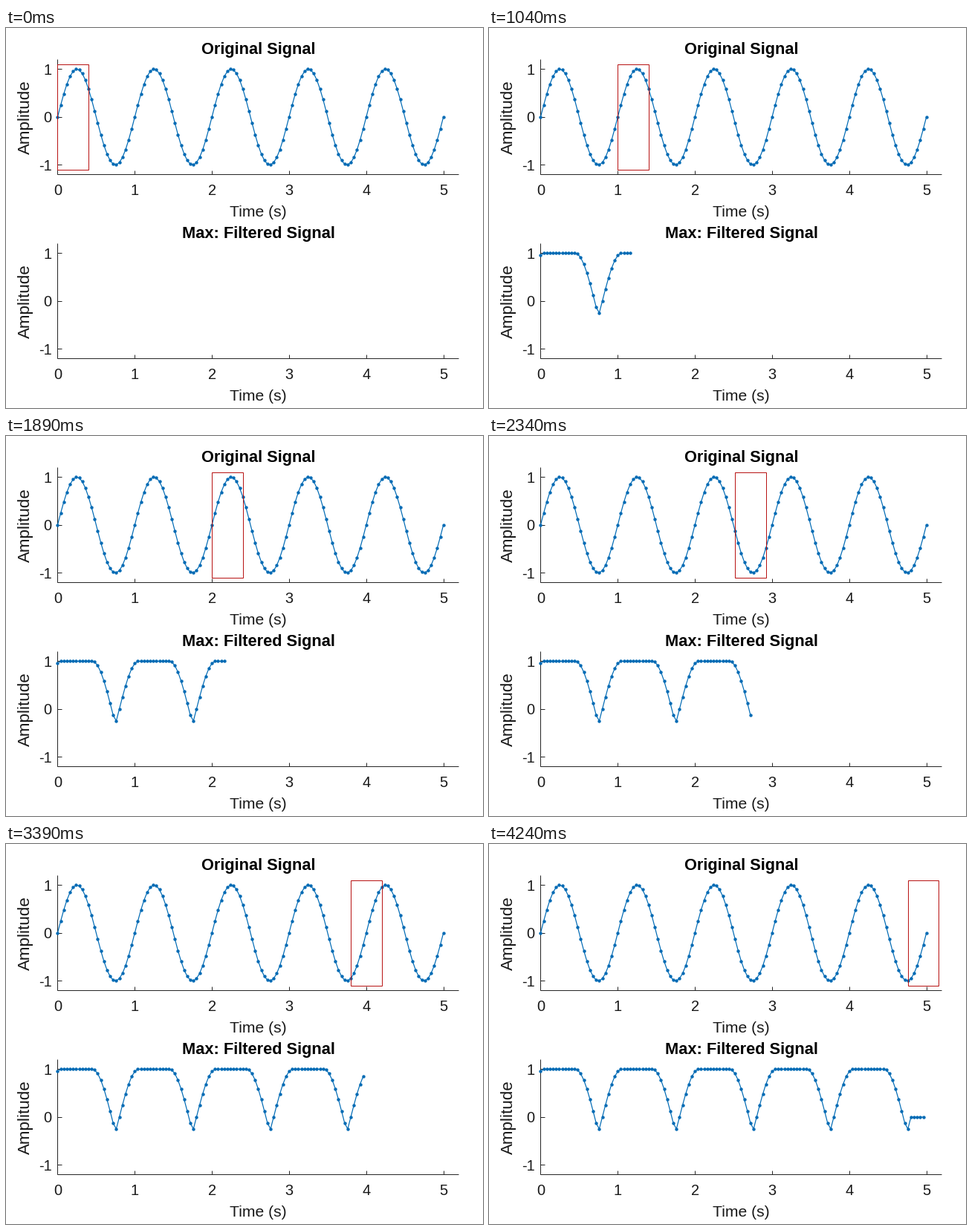
These frames come from a looping animation (642 by 512 pixels, 4290 ms). A matplotlib script:

```python
import numpy as np
import matplotlib.pyplot as plt
from matplotlib.animation import FuncAnimation
from matplotlib.lines import Line2D
from matplotlib.patches import Rectangle
from matplotlib.transforms import Affine2D

W, H, DPI = 642, 512, 100
PX = 72 / DPI                      # points per pixel
TICK_MS, LOOP_MS = 10, 4290
FIRST_MS, STEP_MS = 40, 50         # the first pose is held a little shorter

X0, XS, YS = 69.45, 540 / 5.2, 155 / 2.4
TOP, BOTTOM = 119.9, 367.9         # y pixel of amplitude 0
AXIS, INK, BLUE, RED = "#262626", "#181818", "#006ab4", "#b81414"

DT, HALF = 0.04, 5
t = np.arange(126) * DT
signal = np.sin(2 * np.pi * t)
filtered = np.array([signal[max(0, i - HALF):i + HALF + 1].max()
                     for i in range(len(t))])

fig = plt.figure(figsize=(W / 100, H / 100), dpi=DPI, facecolor="white")
pixels = Affine2D().scale(1 / W, -1 / H).translate(0, 1) + fig.transFigure


def line(x, y, color=AXIS, width=1, **kw):
    art = Line2D(x, y, color=color, lw=width * PX, transform=pixels, **kw)
    return fig.add_artist(art)


def curve(x, y, mid):
    return line(X0 + XS * x, mid - YS * y, BLUE, 1.2, marker="o",
                markersize=4.4 * PX, markeredgewidth=0)


def text(x, y, s, size, color=INK, ha="center", **kw):
    fig.text(x, y, s, transform=pixels, fontsize=size * PX, color=color,
             family="Liberation Sans", ha=ha, va="baseline", **kw)


def panel(mid, title):
    base = mid + 1.2 * YS
    line([X0, X0], [mid - 1.2 * YS, base], solid_capstyle="butt")
    line([X0, X0 + 5.2 * XS], [base, base], solid_capstyle="butt")
    for v in range(6):
        x = X0 + v * XS
        line([x, x], [base, base - 5.4], solid_capstyle="butt")
        text(x, base + 28, str(v), 20)
    for v in (-1, 0, 1):
        y = mid - v * YS
        line([X0, X0 + 5.4], [y, y], solid_capstyle="butt")
        text(61.5, y + 7.4, str(v), 20, ha="right")
    text(340, mid - 85, title, 21.8, "black", weight="bold")
    text(339.5, base + 56.7, "Time (s)", 21.2)
    text(32, mid + 0.3, "Amplitude", 22.4, rotation=90,
         rotation_mode="anchor")


panel(TOP, "Original Signal")
panel(BOTTOM, "Max: Filtered Signal")
curve(t, signal, TOP)
result = curve(t[:0], filtered[:0], BOTTOM)
window = fig.add_artist(Rectangle(
    (X0, TOP - 1.1 * YS), 2 * HALF * DT * XS, 2.2 * YS,
    fill=False, ec=RED, lw=PX, transform=pixels, zorder=3))


def half_steps(pose):
    """Half steps done: the window moves first, then its point appears."""
    return int(round(np.interp(pose, [0, 14, 28, 47, 68, 85],
                               [0, 40, 81, 137, 200, 249])))


def update(tick):
    ms = tick * TICK_MS
    pose = 0 if ms < FIRST_MS else 1 + (ms - FIRST_MS) // STEP_MS
    i, shown = divmod(half_steps(pose), 2)
    n = i + shown
    window.set_x(X0 + XS * t[max(0, i - HALF)])
    result.set_data(X0 + XS * t[:n], BOTTOM - YS * filtered[:n])
    return window, result


anim = FuncAnimation(fig, update, frames=LOOP_MS // TICK_MS,
                     init_func=lambda: update(0), interval=TICK_MS,
                     repeat=True, repeat_delay=0)
plt.show()
```
